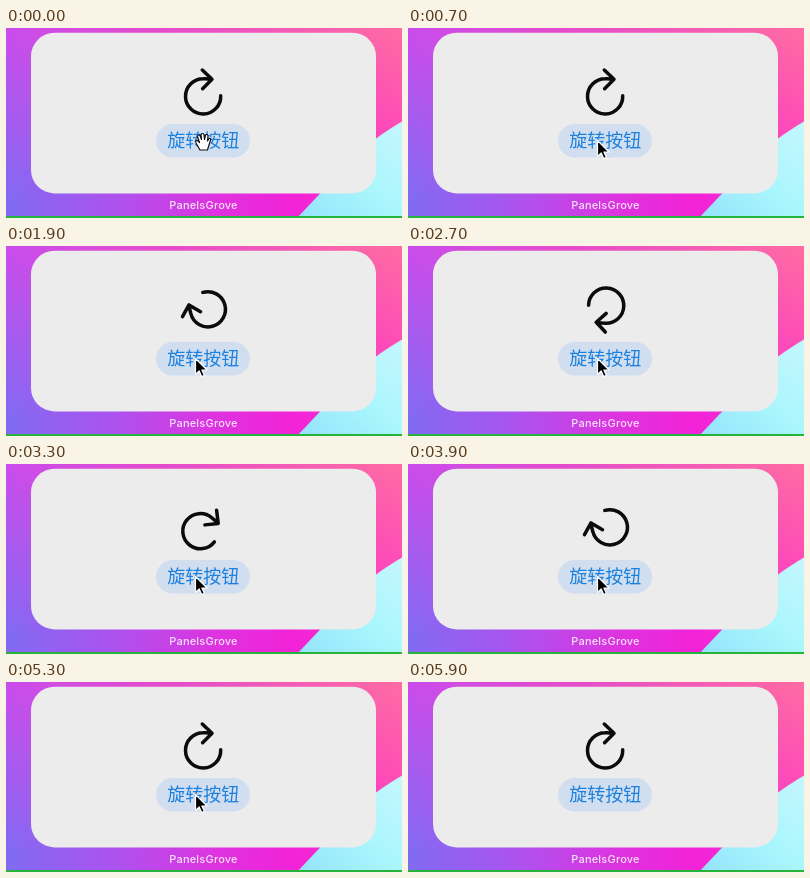
Write an HTML page that moves like this. It is 396x190 px and loops after 6.1 s.

```html
<!DOCTYPE html>
<html lang="zh-CN">
<head>
<meta charset="utf-8">
<title>旋转按钮</title>
<style>
  html, body { margin: 0; width: 100%; height: 100%; overflow: hidden; }
  svg { display: block; }
  .label { font: 18px "Noto Sans CJK SC", "Noto Sans CJK", sans-serif; fill: #1b80de; }
  .caption { font: 500 11px Inter, sans-serif; letter-spacing: .2px; fill: #fff; opacity: .85; }
  .arrow { fill: none; stroke: #0b0b0b; stroke-width: 3.5; stroke-linecap: round; stroke-linejoin: round; }
</style>
</head>
<body>
<svg width="396" height="190" viewBox="0 0 396 190">
  <defs>
    <linearGradient id="upper">
      <stop offset="0" stop-color="#cb4cec"/>
      <stop offset=".4" stop-color="#e64ccb"/>
      <stop offset="1" stop-color="#ff6ca2"/>
    </linearGradient>
    <linearGradient id="lower">
      <stop offset="0" stop-color="#806bf3"/>
      <stop offset=".28" stop-color="#ad52ee"/>
      <stop offset=".52" stop-color="#dc34e0"/>
      <stop offset=".72" stop-color="#f222d8"/>
      <stop offset="1" stop-color="#ff38c4"/>
    </linearGradient>
    <linearGradient id="ice" x1="0" y1="1" x2="1" y2="0">
      <stop offset="0" stop-color="#93e2fb"/>
      <stop offset=".5" stop-color="#aaf6fd"/>
      <stop offset="1" stop-color="#c6f6fd"/>
    </linearGradient>
    <linearGradient id="fade" x2="0" y2="1">
      <stop offset="0" stop-color="#000"/>
      <stop offset=".9" stop-color="#fff"/>
    </linearGradient>
    <mask id="down"><rect width="396" height="190" fill="url(#fade)"/></mask>
  </defs>

  <rect width="396" height="190" fill="url(#upper)"/>
  <rect width="396" height="190" fill="url(#lower)" mask="url(#down)"/>
  <path d="M396 93.500Q380 103 368 112Q330 148 291 190H396Z" fill="url(#ice)"/>
  <rect y="188" width="396" height="2" fill="#25b33c"/>

  <rect x="25" y="4.800" width="345" height="160.600" rx="23.500" fill="#ececec"/>
  <path id="icon" class="arrow"
    d="M214.700 67.700A17.600 17.600 0 1 1 197.100 50.800Q201.500 50.600 205.500 51.300M196.300 42L206 51.200L196.600 60.700"/>
  <rect x="150" y="96" width="94" height="33.500" rx="16.750" fill="#d1deef"/>
  <text class="label" x="161.300" y="119">旋转按钮</text>
  <text class="caption" x="197.500" y="181" text-anchor="middle">PanelsGrove</text>

  <path id="hand" fill="#fff" stroke="#111" stroke-width="1.2" stroke-linejoin="round"
    d="M194 122l-4-7q-1-3 1.5-2.500l2 2-2-6q.5-2.500 2.500-1l1.500 4-.5-5q1.500-2 3 0l.5 5 1-4.500q2-1.500 2.500 1l-.5 5 1.500-2.500q2-.5 1.500 2l-2 6-1 3.500z"/>
  <path id="pointer" stroke="#fff" stroke-width="1.2" stroke-linejoin="round"
    d="M189.500 112.500v16l3.700-3.500 2.500 5.600 2.700-1.200-2.500-5.400h5.100z"/>
</svg>
<script>
  const LOOP = 6100, STEP = 200, LEAD = 100;
  const SPIN_START = 1190, SPIN_TIME = 3000;
  const el = id => document.getElementById(id);
  const show = (id, on) => el(id).style.display = on ? "" : "none";

  // Three even turns, one per second
  const angle = t => Math.min(Math.max(t - SPIN_START, 0), SPIN_TIME) * .36;

  function draw(now) {
    const time = now % LOOP;
    const t = time < LEAD ? 0 : LEAD + Math.floor((time - LEAD) / STEP) * STEP;
    el("icon").setAttribute("transform", `rotate(${angle(t)} 197.5 64)`);
    show("hand", t < 300);
    show("pointer", t >= 300 && t < 5700);
  }

  const start = performance.now();
  function tick() {
    draw(performance.now() - start);
    requestAnimationFrame(tick);
  }
  tick();
</script>
</body>
</html>
```
